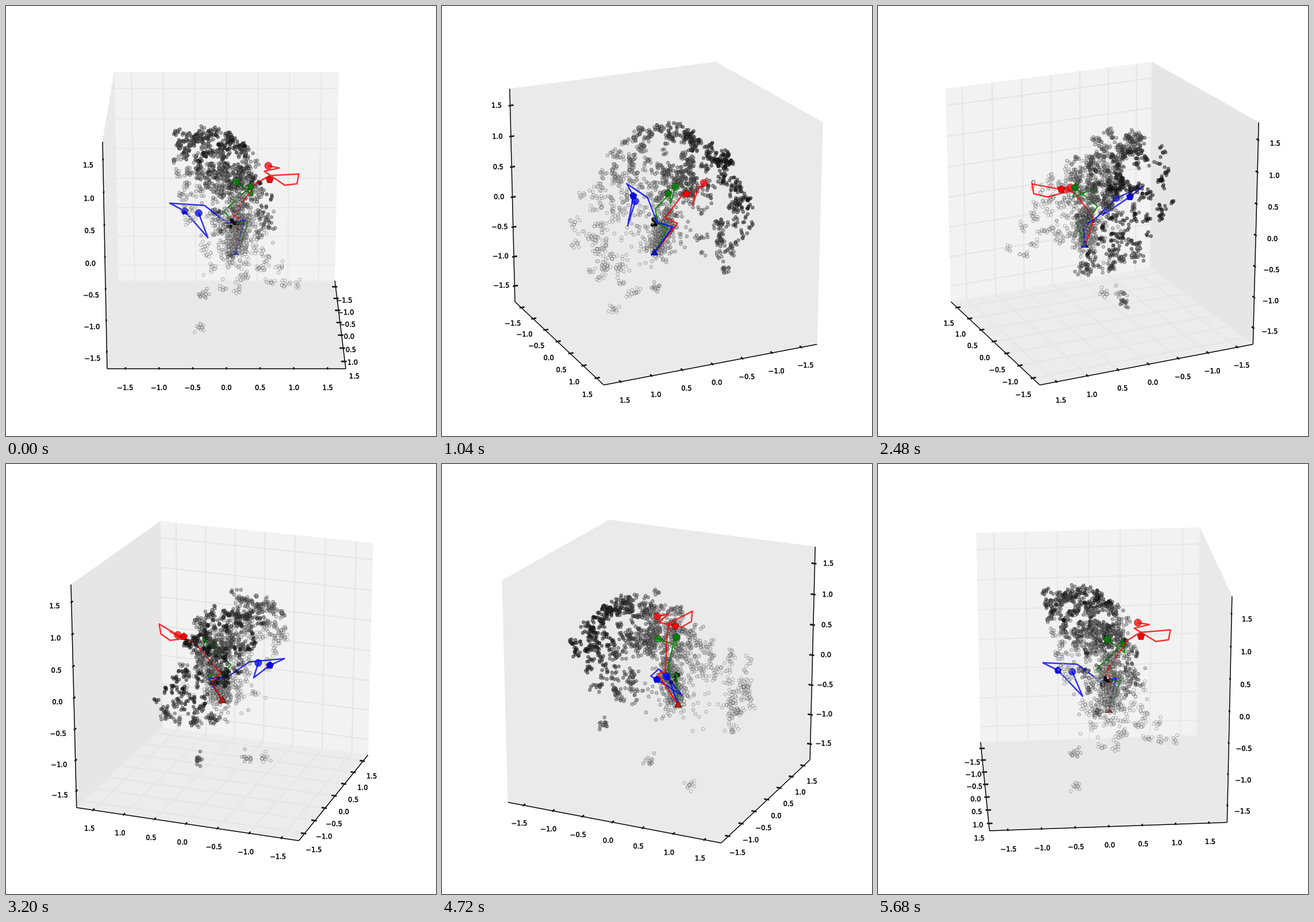
Write an HTML page with a canvas that moves like this. It is 748 px wide and 748 px high and loops after 5.76 s.

```html
<!DOCTYPE html>
<html lang="en">
<head>
<meta charset="utf-8">
<title>Rotating 3D scatter</title>
<style>
  html, body { margin: 0; width: 100%; height: 100%; overflow: hidden; background: #fff; }
  canvas { display: block; width: 748px; height: 748px; }
</style>
</head>
<body>
<canvas id="stage" width="748" height="748"></canvas>
<script>
const ctx = document.getElementById('stage').getContext('2d');
const STEP_MS = 80, STEPS = 72;
const DIST = 3862, CX = 383.5, CY = 365;
const HALF = 201.1;          // half the pane cube
const UNIT = 113.6;          // one axis unit
const ELEV = 20 * Math.PI / 180, CE = Math.cos(ELEV), SE = Math.sin(ELEV);
const TICKS = Array.from({ length: 7 }, (_, i) => i / 2 - 1.5);
const TAU = 2 * Math.PI;

// Key points of the three strands, which share one root
const ROOT = [23, 16, -60];
const PATHS = [
  { color: '#ff0000', pent: [-10, 75, 63], bends: [
    [-19, 21, -10], [0, 11, 0], [-15, 52, 55], [-23, 75, 66], [0, 125, 77],
    [0, 122, 59], [-10, 101, 53], [-38, 66, 69], [-32, 92, 77], [-44, 73, 77]] },
  { color: '#008000', pent: [8, 41, 56], bends: [
    [9, 38, -10], [14, 12, -8], [12, -4, 13], [5, 41, 55], [6, 46, 39], [-17, 17, 57]] },
  { color: '#0000ff', pent: [23, -72, 17], bends: [
    [-5, 31, -11], [11, 2, -10], [11, -38, 23], [24, -98, 32], [23, -72, 17],
    [52, -32, -21], [30, -48, 16]] }
];

function makeRandom(seed) {
  return () => {
    seed = (seed + 0x6D2B79F5) | 0;
    let t = Math.imul(seed ^ (seed >>> 15), 1 | seed);
    t = (t + Math.imul(t ^ (t >>> 7), 61 | t)) ^ t;
    return ((t ^ (t >>> 14)) >>> 0) / 4294967296;
  };
}
const random = makeRandom(11);
const gauss = () => (random() + random() + random() + random() - 2) * 1.73;
const jitter = (p, sd) => p.map(v => v + gauss() * sd);

// Shade is fixed by place: low x is dark, high x nearly hollow
function makeDot(p) {
  const light = Math.max(0, Math.min(1, (p[0] - 0.4 * p[2] + 150) / 260));
  const gray = Math.round(25 + 200 * light);
  return {
    p,
    fill: `rgba(${gray},${gray},${gray},${0.55 - 0.25 * light})`,
    edge: `rgba(0,0,0,${0.42 - 0.1 * light})`
  };
}

function makeDots() {
  const dots = [];
  const addKnot = (center, count, sd = 4) => {
    for (let i = 0; i < count; i++) dots.push(makeDot(jitter(center, sd)));
  };
  // Open shell arching over the stem, in small knots
  const knots = 135;
  for (let i = 0; i < knots; i++) {
    const a = ((i + 0.5) / knots - 0.5) * 0.72 * TAU;
    const radius = 140 - 42 * Math.max(0, Math.sin(2 * a));
    const across = (i * 0.618) % 1 * 2 - 1;
    const y = 15 - 65 * Math.cos(a) + across * (57 - 12 * Math.cos(a));
    addKnot(jitter([radius * Math.sin(a), y, radius * Math.cos(a)], 9), 3 + 7 * random());
  }
  // Loose core, stem, and three stray groups
  for (let i = 0; i < 85; i++) {
    addKnot([-18 + 36 * gauss(), 4 + 24 * gauss(), 62 + 27 * gauss()], 2 + 5 * random());
  }
  for (let i = 0; i < 110; i++) addKnot([25 + 35 * gauss(), 10 + 28 * gauss(), -15 + 35 * gauss()], 1);
  for (let i = 0; i < 300; i++) {
    const u = random();
    addKnot([-2 + 22 * u, 23 - 6 * u, 12 - 72 * u], 1, 9);
  }
  for (const stray of [[74, -49, -181], [-117, 8, -115], [-4, -41, -150]]) addKnot(stray, 13, 5);
  // Solid spots near the fork
  for (let i = 0; i < 6; i++) {
    dots.push({ p: jitter([17, 11, -5], 5), fill: 'rgba(0,0,0,.8)', edge: '#000' });
  }
  return dots;
}
const dots = makeDots();

let cosA = 1, sinA = 0;
const forward = p => p[0] * cosA + p[1] * sinA;

function project(p) {
  const right = p[1] * cosA - p[0] * sinA, f = forward(p);
  const k = DIST / (DIST - CE * f - SE * p[2]);
  return [CX + right * k, CY - (CE * p[2] - SE * f) * k];
}

function trace(points) {
  ctx.beginPath();
  for (const p of points) ctx.lineTo(...project(p));
}

function strokeLine(points, color, width) {
  trace(points);
  ctx.strokeStyle = color;
  ctx.lineWidth = width;
  ctx.stroke();
}

const withCoord = (p, axis, value) => p.map((v, i) => i === axis ? value : v);
const flip = (p, axis) => withCoord(p, axis, -p[axis]);

// Tones merge when the shaded walls take up little or most of the view
function paneColors() {
  if (Math.abs(cosA) < 0.7) return { panes: ['#eaeaea', '#eaeaea', '#eaeaea'], grid: null };
  if (Math.abs(sinA) < 0.25) return { panes: ['#f2f2f2', '#e9e9e9', '#e9e9e9'], grid: '#e9e9e9' };
  return { panes: ['#f2f2f2', '#e6e6e6', '#ececec'], grid: '#e6e6e6' };
}

function drawPanes(back) {
  const { panes, grid } = paneColors();
  panes.forEach((color, axis) => {
    const j = (axis + 1) % 3, k = (axis + 2) % 3;
    trace([back, flip(back, j), flip(flip(back, j), k), flip(back, k)]);
    ctx.closePath();
    ctx.fillStyle = ctx.strokeStyle = color;
    ctx.lineWidth = 0.6;
    ctx.fill();
    ctx.stroke();
  });
  if (!grid) return;
  for (let axis = 0; axis < 3; axis++) {
    for (const tick of TICKS) {
      const corner = withCoord(back, axis, tick * UNIT);
      strokeLine([flip(corner, (axis + 1) % 3), corner, flip(corner, (axis + 2) % 3)], grid, 2.5);
    }
  }
}

function drawAxis(back, axis) {
  const dir = axis === 0 ? 1 : 0;
  const edge = flip(back, dir), out = Math.sign(edge[dir]);
  strokeLine([edge, flip(edge, axis)], '#000', 1.5);
  for (const tick of TICKS) {
    const at = withCoord(edge, axis, tick * UNIT);
    const inner = withCoord(at, dir, edge[dir] - out * 6.4);
    strokeLine([withCoord(at, dir, edge[dir] + out * 3.2), inner], '#1a1a1a', 2.7);
    const [x, y] = project(inner.map((v, i) => i === axis ? v : v + Math.sign(v) * 23));
    const label = (tick < 0 ? '\u2212' : '') + Math.abs(tick).toFixed(1);
    ctx.fillText(label, x, y + 5);
    ctx.lineWidth = 0.5;
    ctx.strokeStyle = '#000';
    ctx.strokeText(label, x, y + 5);
  }
}

function drawDots(list) {
  ctx.lineWidth = 0.8;
  for (const { p, fill, edge } of list) {
    const [x, y] = project(p);
    ctx.beginPath();
    ctx.arc(x, y, 2.9, 0, TAU);
    ctx.fillStyle = fill;
    ctx.strokeStyle = edge;
    ctx.fill();
    ctx.stroke();
  }
}

function drawMarker(p, sides, radius, color, alpha) {
  const [x, y] = project(p);
  ctx.globalAlpha = alpha;
  ctx.beginPath();
  if (sides) {
    for (let i = 0; i < sides; i++) {
      const a = i * TAU / sides - TAU / 4;
      ctx.lineTo(x + radius * Math.cos(a), y + radius * Math.sin(a));
    }
    ctx.closePath();
  } else {
    ctx.arc(x, y, radius, 0, TAU);
  }
  ctx.fillStyle = color;
  ctx.strokeStyle = 'rgba(0,0,0,.6)';
  ctx.lineWidth = 0.9;
  ctx.fill();
  ctx.stroke();
  ctx.globalAlpha = 1;
}

function drawPaths() {
  const order = sinA >= 0 ? PATHS : [...PATHS].reverse();
  for (const { color, bends, pent } of order) {
    ctx.globalAlpha = 0.8;
    strokeLine([ROOT, ...bends], color, 2.5);
    drawMarker(ROOT, 3, 7, color, 0.75);
    drawMarker(bends[bends.length - 1], 0, 6.4, color, 0.75);
    drawMarker(pent, 5, 6.6, color, 1);
  }
}

function draw(step) {
  const azim = step * TAU / STEPS;
  cosA = Math.cos(azim);
  sinA = Math.sin(azim);
  const back = [cosA > -1e-9 ? -HALF : HALF, sinA > -1e-9 ? -HALF : HALF, -HALF];

  ctx.fillStyle = '#fff';
  ctx.fillRect(0, 0, 748, 748);
  ctx.lineJoin = 'round';
  drawPanes(back);

  ctx.font = '11.5px "DejaVu Sans", sans-serif';
  ctx.textAlign = 'center';
  ctx.textBaseline = 'middle';
  ctx.fillStyle = '#000';
  for (let axis = 0; axis < 3; axis++) drawAxis(back, axis);

  // Seen from the sides, the strands lie over every dot
  const split = Math.abs(sinA) > 0.8 ? Infinity : 8;
  const sorted = dots.map(dot => ({ ...dot, depth: forward(dot.p) }))
    .sort((a, b) => a.depth - b.depth);
  drawDots(sorted.filter(dot => dot.depth < split));
  drawPaths();
  drawDots(sorted.filter(dot => dot.depth >= split));
}

let shown = -1;
function tick() {
  const step = Math.floor(performance.now() / STEP_MS) % STEPS;
  if (step !== shown) draw(shown = step);
  requestAnimationFrame(tick);
}
tick();
</script>
</body>
</html>
```
